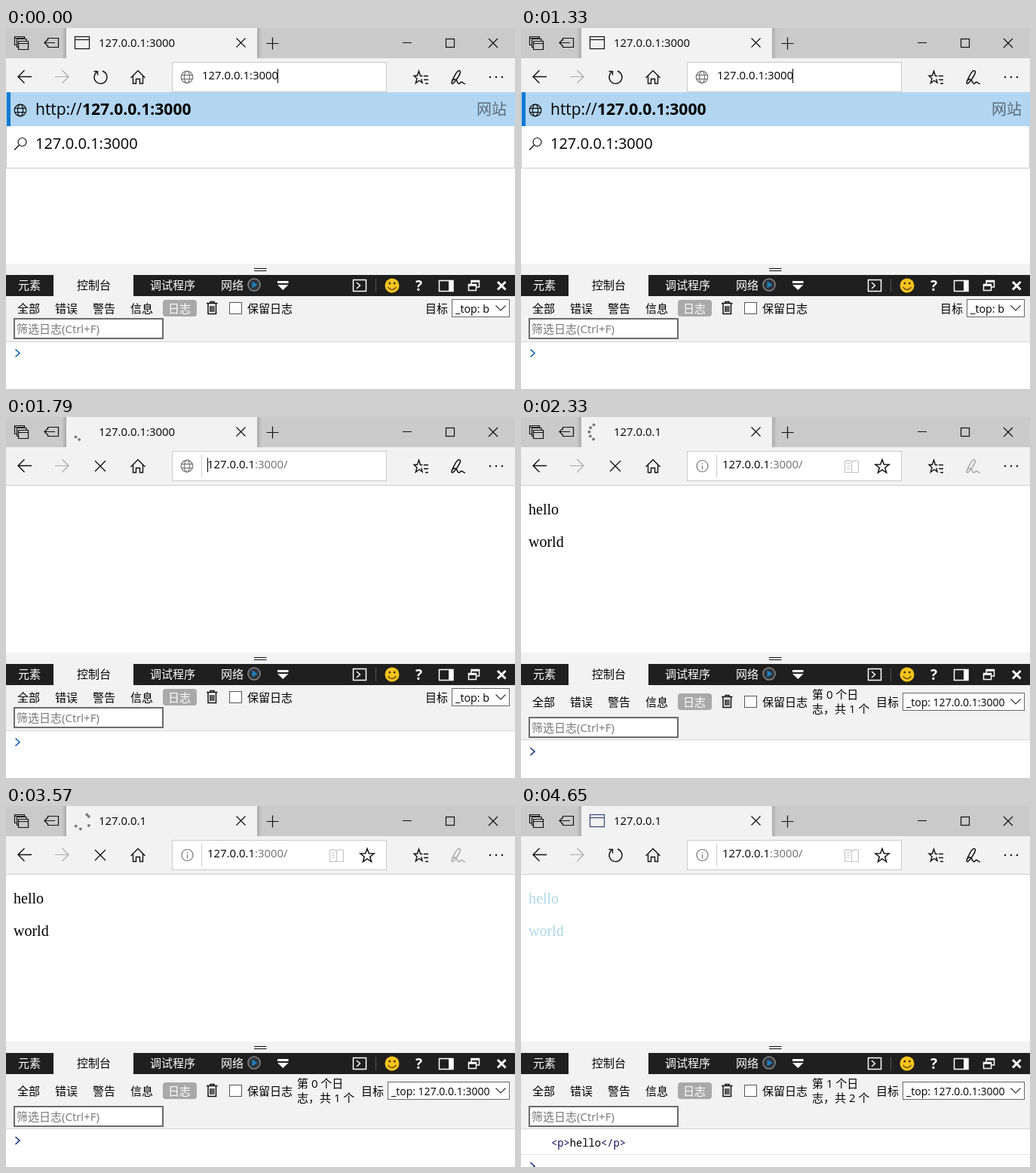
These frames come from a looping animation (675x478 px, 6210 ms). An HTML page:

```html
<!DOCTYPE html>
<html lang="zh">
<head>
<meta charset="utf-8">
<title>Browser loading a local page</title>
<style>
  html, body { margin: 0; width: 100%; height: 100%; overflow: hidden; background: #fff; }
  svg { display: block; width: 675px; height: 478px; }
  text { font: 15px "Open Sans", "Noto Sans CJK SC", "Noto Sans CJK", sans-serif; white-space: pre; }
  .url { font-size: 14.9px; }
  .big { font-size: 20px; }
  .serif { font: 20px "Liberation Serif", serif; }
  .mono { font: 13.75px "Noto Sans Mono", monospace; }
  .line { fill: none; stroke: #111; stroke-width: 1.2; }
  .white { stroke: #fff; stroke-width: 1.5; }
  .grey { stroke: #777; }
  .pale { stroke: #aaa; }
</style>
</head>
<body>
<svg viewBox="0 0 675 478" xmlns="http://www.w3.org/2000/svg">
  <defs>
    <linearGradient id="edge">
      <stop offset="0" stop-color="#000" stop-opacity="0"/>
      <stop offset="1" stop-color="#000" stop-opacity=".16"/>
    </linearGradient>
    <g id="globe">
      <circle r="7.8"/>
      <ellipse rx="3.6" ry="7.8"/>
      <path d="M-7.3 -2.7H7.3M-7.3 2.7H7.3"/>
    </g>
    <path id="cross" d="M-6 -6L6 6M6 -6L-6 6"/>
    <g id="window">
      <rect x="91.5" y="11.5" width="19" height="16"/>
      <path d="M91.5 15.5H110.5"/>
    </g>
    <path id="pen" d="M591 72C593 66 598 56 601 56.500C605 57 600 65 596 70C593 74 591 75 591 72C592 67 597 67 598 70C599 74 601 75 603 72C605 70 606 74 609 74"/>
    <path id="prompt" d="M12.500 -5L18 0L12.500 5"/>
  </defs>

  <!-- tab strip -->
  <rect width="675" height="40" fill="#cacaca"/>
  <rect x="74" width="6" height="40" fill="url(#edge)"/>
  <rect x="-339" width="6" height="40" fill="url(#edge)" transform="scale(-1 1)"/>
  <rect x="80" width="253" height="40" fill="#f2f2f2"/>
  <g class="line">
    <path d="M14.500 22.500H11.500V11.500H24.500V14.500M11.500 13.500H24.500M14.500 25.500V14.500M16.500 17.500H29.500V28.500H16.500ZM16.500 20.500H29.500M14.500 14.500H27V17M14.500 25.500H16"/>
    <path d="M55.500 16.500V13.500H69.500V25.500H55.500V23M51 19.500H65M55 15.500L51 19.500L55 23.500"/>
    <use href="#cross" x="311.500" y="19.500"/>
    <path d="M345.500 20.500H361.500M353.500 12.500V28.500M526 19.500H538"/>
    <rect x="583.500" y="14.500" width="11" height="11"/>
    <use href="#cross" x="646" y="20"/>
  </g>
  <use href="#window" class="line" data-in="type"/>
  <use href="#window" class="line" style="stroke:#34477a" data-in="done"/>
  <g id="ring" fill="#777" data-in="wait load"></g>
  <text class="url" x="123" y="25" data-in="type wait">127.0.0.1:3000</text>
  <text class="url" x="123" y="25" data-in="load done">127.0.0.1</text>

  <!-- navigation bar -->
  <rect y="40" width="675" height="51" fill="#f2f2f2"/>
  <rect y="90" width="675" height="1" fill="#cfcfcf"/>
  <rect x="220.500" y="45.500" width="284" height="39" fill="#fff" stroke="#cacaca"/>
  <g class="line">
    <path d="M34 64.500H16M24.500 56L16 64.500L24.500 73" stroke-width="1.400"/>
    <path class="pale" d="M65 64.500H83M74.500 56L83 64.500L74.500 73"/>
    <path data-in="type done" d="M128 57A8.500 8.500 0 1 1 120.500 58.200M116.500 57.500H121.500V62.500" stroke-width="1.400"/>
    <path data-in="wait load" d="M118 58L132 72M132 58L118 72" stroke-width="1.400"/>
    <path d="M165.500 66L175 56.500L184.500 66M168.500 63.500V73.500H172.500V67.500H177.500V73.500H181.500V63.500" stroke-width="1.400"/>
    <path d="M560 63.500H554M560 68.500H554M560 73.500H556M552.500 63.500H549.500L547.500 57L545.300 63.200H541L545 67L543.300 73L548 69.500L552 72.500L550.800 67.500" stroke-width="1.400"/>
    <use href="#globe" x="240" y="65" class="grey" data-in="type wait"/>
    <g class="grey" data-in="load done">
      <circle cx="240.500" cy="65" r="7.500"/>
      <path d="M240.500 64V69.500M240.500 61V62.500"/>
    </g>
    <path data-in="wait load done" d="M259.500 50V80" style="stroke:#d0d0d0"/>
    <g data-in="load done">
      <path d="M438.500 59.500C436 57.500 432 57.500 429.500 58.500V73.500H447.500V58.500C445 57.500 441 57.500 438.500 59.500V73.500M432 61.500H436M432 65H436M432 68.500H436" style="stroke:#c4c4c4"/>
      <path id="star" stroke-width="1.500"/>
    </g>
    <use href="#pen" data-in="type wait done" stroke-width="1.500"/>
    <use href="#pen" class="pale" data-in="load" stroke-width="1.500"/>
  </g>
  <g fill="#111">
    <circle cx="642" cy="65" r="1.200"/><circle cx="650" cy="65" r="1.200"/><circle cx="658" cy="65" r="1.200"/>
  </g>
  <text class="url" x="260" y="68" data-in="type">127.0.0.1:3000</text>
  <text class="url" x="267" y="68" data-in="wait load done">127.0.0.1<tspan fill="#707070">:3000/</tspan></text>
  <rect id="caret" x="360" y="54" width="1" height="19"/>
  <rect x="267" y="54" width="1" height="19" data-in="wait"/>

  <!-- address suggestions -->
  <g data-in="type">
    <rect x=".5" y="85.500" width="674" height="100" fill="#fff" stroke="#cacaca"/>
    <rect y="85" width="675" height="45" fill="#b2d6f2"/>
    <rect x="1" y="85" width="5" height="45" fill="#0f79d2"/>
    <use href="#globe" x="19" y="109" class="line"/>
    <text x="39" y="115" style="font-size:21px">http://</text>
    <text x="101" y="115" style="font-size:21.100px;font-weight:700">127.0.0.1:3000</text>
    <text class="big" x="624" y="115" fill="#5d6a75">网站</text>
    <g class="line"><circle cx="21.500" cy="151" r="5.500"/><path d="M17.500 155L11 161.500"/></g>
    <text class="big" x="39" y="160">127.0.0.1:3000</text>
  </g>

  <!-- page -->
  <g id="words" data-in="load done">
    <text class="serif" x="10" y="129">hello</text>
    <text class="serif" x="10" y="172">world</text>
  </g>

  <!-- developer tools -->
  <rect y="312" width="675" height="15" fill="#f2f2f2"/>
  <path class="line" d="M329 318.500H345.500M329 321.500H345.500"/>
  <rect y="327" width="675" height="28" fill="#1f1f1f"/>
  <rect x="63" y="327" width="106" height="28" fill="#f2f2f2"/>
  <g fill="#fff">
    <text x="16" y="346">元素</text>
    <text x="94" y="346" fill="#000">控制台</text>
    <text x="191" y="346">调试程序</text>
    <text x="285" y="346">网络</text>
    <path d="M360 335H374.500V338H360ZM360 340H374.500L367.300 347Z"/>
    <text x="543" y="348" style="font-size:19px;font-weight:700">?</text>
    <rect x="587" y="335" width="6" height="13"/>
  </g>
  <circle cx="329" cy="340" r="8" fill="#30343a" stroke="#8a8a8a" stroke-width="1.500"/>
  <path d="M326.500 335.500L333.500 340L326.500 344.500Z" fill="#1c80bd"/>
  <g class="line white">
    <rect x="460.500" y="333.500" width="17" height="15"/>
    <path d="M465 337L469.500 341L465 345"/>
    <path d="M490.500 332V350" style="stroke:#555;stroke-width:1"/>
    <rect x="574.500" y="334.500" width="18.500" height="14"/>
    <path d="M617 339V334.500H627.500V343H624M617 336H627.500M613.500 339.500H623.500V347.500H613.500ZM613.500 341H623.500"/>
    <path d="M652 336L662.500 346.500M662.500 336L652 346.500" style="stroke-width:3"/>
  </g>
  <circle cx="512" cy="341" r="9.500" fill="#f8c51c"/>
  <circle cx="508.800" cy="338" r="1.500" fill="#493414"/><circle cx="515.200" cy="338" r="1.500" fill="#493414"/>
  <path d="M506.500 343Q512 350 517.500 343" fill="none" stroke="#6b4b12" stroke-width="1.400"/>

  <rect id="panel" y="355" width="675" fill="#f2f2f2"/>
  <rect id="rule" width="675" height="1" fill="#d6d6d6"/>
  <g id="tools">
    <text x="15" y="377">全部</text>
    <text x="65" y="377">错误</text>
    <text x="115" y="377">警告</text>
    <text x="165" y="377">信息</text>
    <rect x="208" y="360" width="45" height="22" rx="4" fill="#a9a9a9"/>
    <text x="215" y="377" fill="#fff">日志</text>
    <path class="line" style="stroke-width:1.500" d="M266 364.500H280.500M271 364V362.500H276V364M268 365V378.500H278.500V365M271 368V376M273.300 368V376M275.600 368V376"/>
    <rect x="296.500" y="363.500" width="16" height="15" fill="#fff" stroke="#555"/>
    <text x="320" y="377">保留日志</text>
    <g data-in="type wait">
      <text x="556" y="377">目标</text>
      <rect x="591.500" y="359.500" width="76" height="23" fill="#fff" stroke="#666"/>
      <text x="596" y="377" style="font-size:14.300px">_top: b</text>
    </g>
    <g data-in="load done">
      <text x="471" y="377">目标</text>
      <rect x="506.500" y="359.500" width="161" height="23" fill="#fff" stroke="#666"/>
      <text x="511" y="377" style="font-size:14px">_top: 127.0.0.1:3000</text>
    </g>
    <path class="line" style="stroke:#333" d="M649.500 367.500L656 374L662.500 367.500"/>
  </g>
  <g data-in="load done">
    <text id="count1" x="386" y="373"></text>
    <text id="count2" x="386" y="392"></text>
  </g>
  <g id="filter">
    <rect x="11" y="385" width="197" height="26" fill="#fff" stroke="#6b6b6b" stroke-width="2"/>
    <text x="14" y="404" fill="#767676">筛选日志(Ctrl+F)</text>
  </g>
  <g data-in="done">
    <text class="mono" x="40" y="451"><tspan fill="#10105c">&lt;p&gt;</tspan>hello<tspan fill="#10105c">&lt;/p&gt;</tspan></text>
    <rect y="461" width="675" height="1" fill="#e6e6e6"/>
  </g>
  <use id="cursor" href="#prompt" class="line" style="stroke-width:1.600"/>
</svg>
<script>
  const LOOP = 6210, GO = 1560, SHOW = 1865, DONE = 4650, TICK = 77.25;
  const $ = id => document.getElementById(id);
  const set = (id, attrs) => Object.entries(attrs).forEach(([k, v]) => $(id).setAttribute(k, v));
  const parts = [...document.querySelectorAll("[data-in]")]
    .map(el => ({ el, states: el.dataset.in.split(" ") }));

  // five-pointed favourites star
  set("star", {
    d: "M" + Array.from({ length: 10 }, (_, i) => {
      const r = i % 2 ? 3.9 : 9.6, a = i * Math.PI / 5;
      return (479 + r * Math.sin(a)).toFixed(1) + " " + (66 - r * Math.cos(a)).toFixed(1);
    }).join("L") + "Z"
  });

  // [ms, degrees] travelled by each dot, clockwise from the top
  const ORBIT = [[0, 190], [770, 335], [1500, 415], [1870, 565], [2550, 695], [3300, 780], [3600, 900]];
  const DOTS = 5, LAG = 170;
  const dots = Array.from({ length: DOTS }, () => {
    const dot = document.createElementNS("http://www.w3.org/2000/svg", "circle");
    dot.setAttribute("r", 1.9);
    return $("ring").appendChild(dot);
  });

  function angleAt(t) {
    const i = ORBIT.findIndex(p => p[0] > t);
    if (i < 1) return null;
    const [t0, a0] = ORBIT[i - 1], [t1, a1] = ORBIT[i];
    return a0 + (a1 - a0) * (t - t0) / (t1 - t0);
  }

  function spin(t) {
    dots.forEach((dot, i) => {
      const deg = angleAt(t - i * LAG);
      dot.style.display = deg === null ? "none" : "";
      if (deg === null) return;
      const a = deg * Math.PI / 180;
      dot.setAttribute("cx", 101 + 10.6 * Math.sin(a));
      dot.setAttribute("cy", 20 - 10.6 * Math.cos(a));
    });
  }

  let current = "";
  function enter(state) {
    if (state === current) return;
    current = state;
    for (const { el, states } of parts) el.style.display = states.includes(state) ? "" : "none";
    const done = state === "done", loaded = done || state === "load";
    set("panel", { height: loaded ? 72 : 60 });
    set("rule", { y: loaded ? 427 : 415 });
    set("tools", { transform: `translate(0 ${loaded ? 6 : 0})` });
    set("filter", { transform: `translate(0 ${loaded ? 13 : 0})` });
    set("cursor", { y: done ? 477 : loaded ? 443 : 430.5 });
    $("cursor").style.stroke = loaded ? "#12337f" : "#0a5fb0";
    set("words", { fill: done ? "#add8e6" : "#000" });
    $("count1").textContent = `第 ${done ? 1 : 0} 个日`;
    $("count2").textContent = `志，共 ${done ? 2 : 1} 个`;
  }

  function draw(t) {
    enter(t < GO ? "type" : t < SHOW ? "wait" : t < DONE ? "load" : "done");
    $("caret").style.display = t < 800 || (t >= 1330 && t < GO) ? "" : "none";
    if (t >= GO && t < DONE) spin(Math.floor((t - GO + 8) / TICK) * TICK);
  }

  const start = performance.now();
  function frame() {
    draw((performance.now() - start) % LOOP);
    requestAnimationFrame(frame);
  }
  frame();
</script>
</body>
</html>
```
